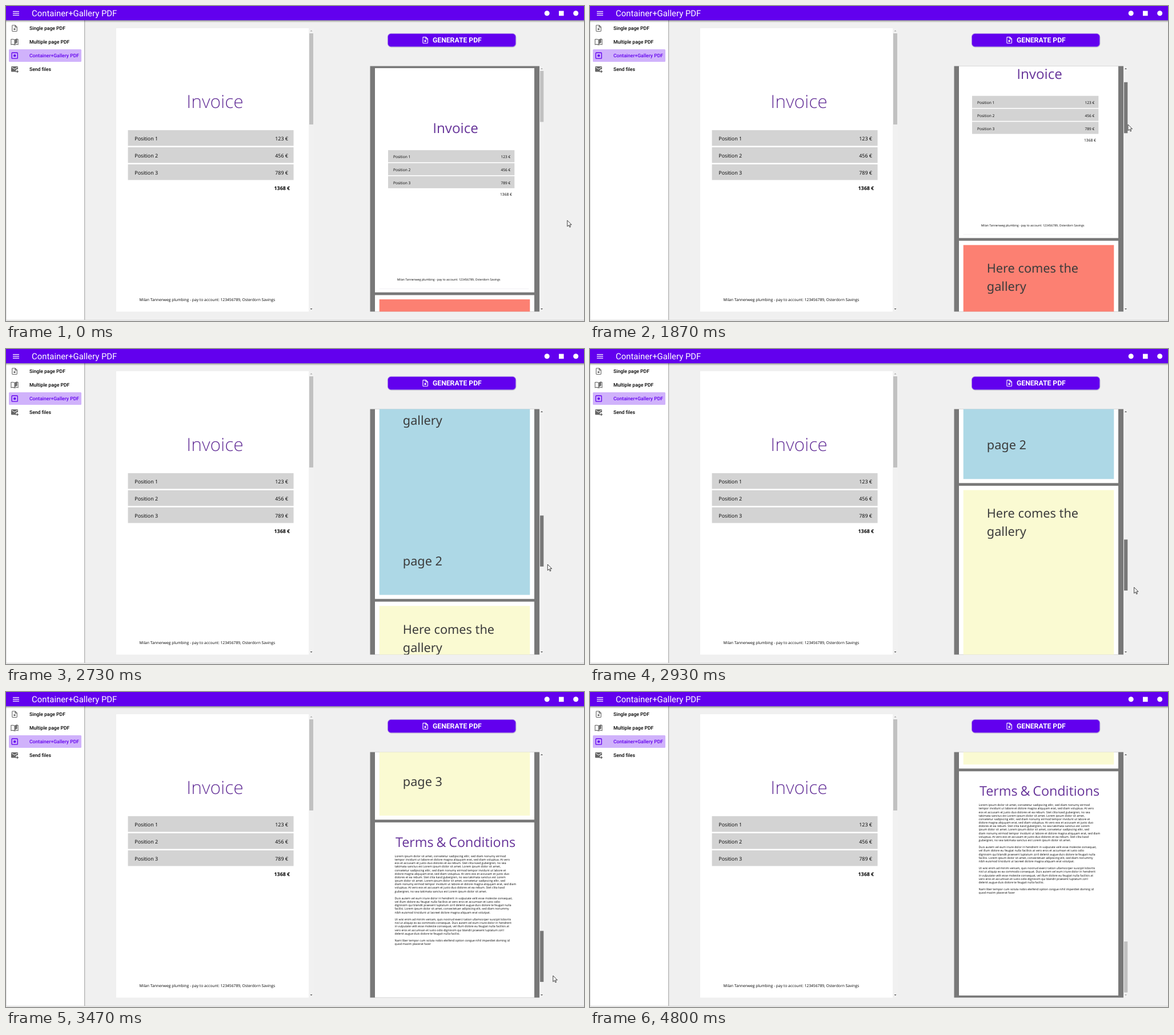
These frames come from a looping animation (1012x553 px, 5.27 s). An HTML page:

```html
<!DOCTYPE html>
<html lang="en">
<head>
<meta charset="utf-8">
<title>Container+Gallery PDF</title>
<style>
  html, body { margin: 0; width: 100%; height: 100%; overflow: hidden; background: #f0f0f0; }
  svg { display: block; }
  text { white-space: pre; text-rendering: geometricPrecision; }
  .rob { font-family: Roboto, sans-serif; }
  .open { font-family: "Open Sans", sans-serif; }
  .noto { font-family: "Noto Sans", sans-serif; }
</style>
</head>
<body>
<svg id="stage" width="1012" height="553" viewBox="0 0 1012 553"></svg>
<script>
const LOOP = 5270, TICK = 1000 / 15;
const PURPLE = '#6200ee', VIOLET = '#663399', GREY = '#787878';
const PITCH = 398.4, PAGE_H = 393.6, MAX_THUMB = 324, RATIO = 1563.5 / MAX_THUMB;

const rect = (x, y, w, h, fill, more = '') =>
  `<rect x="${x}" y="${y}" width="${w}" height="${h}" fill="${fill}" ${more}/>`;
const text = (x, y, size, cls, str, more = '') =>
  `<text x="${x}" y="${y}" font-size="${size}" class="${cls}" ${more}>${str}</text>`;
const end = 'text-anchor="end"', mid = 'text-anchor="middle"';
const arrow = (x, y, dir, fill, id = '') =>
  `<path ${id} d="M${x - 2} ${y + dir}h4l-2 ${-2 * dir}z" fill="${fill}"/>`;
const fileIcon = (x, y, color) =>
  `<g transform="translate(${x} ${y})"><path d="M1.2 .6h4.6l3.2 3.2v6.6q0 .9-.9.9h-6.9q-.7 0-.7-.9v-9q0-.8.7-.8zM5.6 .8v3.2h3.2"
    fill="none" stroke="${color}" stroke-width="1.1"/><circle cx="4.7" cy="7.4" r="1.7" fill="${color}"/></g>`;

const rows = [['Position 1', '123 €'], ['Position 2', '456 €'], ['Position 3', '789 €']];
const footer = 'Milan Tannenweg plumbing - pay to account: 123456789, Osterdorn Savings';

function header() {
  return rect(0, 25, 1012, 4, 'url(#shade)') + rect(0, 0, 1012, 25, PURPLE) +
    `<path d="M12 9.6h11M12 12.9h11M12 16.2h11" stroke="#fff" stroke-width="1.3"/>` +
    text(45, 17.8, 14.9, 'rob', 'Container+Gallery PDF', 'fill="#fff"') +
    `<circle cx="947.2" cy="12.8" r="4.5" fill="#fff"/>` +
    rect(968, 8.6, 8.6, 8.6, '#fff') +
    `<circle cx="997.7" cy="12.8" r="4.5" fill="#fff"/>`;
}

function sidebar() {
  const items = ['Single page PDF', 'Multiple page PDF', 'Container+Gallery PDF', 'Send files'];
  const labels = items.map((s, i) =>
    text(41, 42.1 + 24 * i, 8.6, 'rob', s, `font-weight="500" fill="${i === 2 ? PURPLE : '#000'}"`)).join('');
  const book = `<path d="M8.9 58.6q3-.9 6 .6v9q-3-1.3-6-.5zM15 59.2q2.700-1.400 6.100-.6v9.100q-3.100-.7-6.100.6"
      fill="none" stroke="#666" stroke-width="1.1"/><path d="M15.500 60l4-3.400v7.600l-4 3z" fill="#666"/>`;
  const box = `<rect x="10.100" y="82" width="10.200" height="10.200" rx="1" fill="none" stroke="${PURPLE}" stroke-width="1.300"/>
    <circle cx="15.200" cy="87.100" r="2.200" fill="${PURPLE}"/>`;
  const mail = `<path d="M10 106h10q1 0 1 1v4h-2.500l-2.500 4.500h-6q-1 0-1-1v-7.500q0-1 1-1z" fill="#666"/>
    <path d="M9.800 107.500l5.200 3.200 5.200-3.200" fill="none" stroke="#fff" stroke-width="1"/>
    <path d="M16 114.200h3.200v-2l3 2.800-3 2.800v-2h-3.200z" fill="#666"/>`;
  return rect(0, 25, 137, 526.5, '#fff') + rect(0, 25, 1, 527, '#dedede') +
    rect(137, 25, 1.2, 526.5, '#adadad') + rect(138.2, 25, 1, 526.5, '#dfdfdf') +
    rect(0, 551, 1012, 1, '#d2d2d2') + rect(0, 552, 1012, 1, '#f3f3f3') +
    rect(5, 76, 127, 22, '#d0b2fb', 'rx="1.5"') +
    fileIcon(10.3, 33.2, '#666') + book + box + mail + labels;
}

function form() {
  const list = rows.map(([a, b], i) => {
    const y = 218 + 30 * i;
    return rect(213.5, y, 290, 27.5, '#d3d3d3') +
      text(225.3, y + 17.9, 8.9, 'open', a) + text(494, y + 17.9, 8.9, 'open', b, end);
  }).join('');
  return rect(193, 39, 337, 497.5, '#fff') +
    text(366, 178.6, 31.7, 'open', 'Invoice', `${mid} font-weight="300" fill="${VIOLET}"`) + list +
    text(497, 323, 8.8, 'open', '1368 €', `${end} font-weight="700"`) +
    text(233.6, 518.4, 6.74, 'open', footer) +
    rect(530, 39, 9, 497.5, '#f1f1f1') + rect(531, 48, 7, 160, '#c1c1c1') +
    arrow(534.5, 43.6, 1, '#a3a3a3') + arrow(534.5, 532, -1, '#505050');
}

function button() {
  return rect(668.5, 49, 225, 24, '#000', 'rx="6.5" opacity=".12"') +
    rect(668.3, 48.3, 224.4, 23.4, PURPLE, 'rx="6" stroke="#b59be6" stroke-width="1"') +
    fileIcon(729.4, 54, '#fff') +
    text(747, 64.4, 12.2, 'rob', 'GENERATE PDF', 'font-weight="700" fill="#fff"');
}

const terms = `Lorem ipsum dolor sit amet, consetetur sadipscing elitr, sed diam nonumy eirmod
tempor invidunt ut labore et dolore magna aliquyam erat, sed diam voluptua. At vero
eos et accusam et justo duo dolores et ea rebum. Stet clita kasd gubergren, no sea
takimata sanctus est Lorem ipsum dolor sit amet. Lorem ipsum dolor sit amet,
consetetur sadipscing elitr, sed diam nonumy eirmod tempor invidunt ut labore et
dolore magna aliquyam erat, sed diam voluptua. At vero eos et accusam et justo duo
dolores et ea rebum. Stet clita kasd gubergren, no sea takimata sanctus est Lorem
ipsum dolor sit amet. Lorem ipsum dolor sit amet, consetetur sadipscing elitr, sed
diam nonumy eirmod tempor invidunt ut labore et dolore magna aliquyam erat, sed diam
voluptua. At vero eos et accusam et justo duo dolores et ea rebum. Stet clita kasd
gubergren, no sea takimata sanctus est Lorem ipsum dolor sit amet.

Duis autem vel eum iriure dolor in hendrerit in vulputate velit esse molestie consequat,
vel illum dolore eu feugiat nulla facilisis at vero eros et accumsan et iusto odio
dignissim qui blandit praesent luptatum zzril delenit augue duis dolore te feugait nulla
facilisi. Lorem ipsum dolor sit amet, consectetuer adipiscing elit, sed diam nonummy
nibh euismod tincidunt ut laoreet dolore magna aliquam erat volutpat.

Ut wisi enim ad minim veniam, quis nostrud exerci tation ullamcorper suscipit lobortis
nisl ut aliquip ex ea commodo consequat. Duis autem vel eum iriure dolor in hendrerit
in vulputate velit esse molestie consequat, vel illum dolore eu feugiat nulla facilisis at
vero eros et accumsan et iusto odio dignissim qui blandit praesent luptatum zzril
delenit augue duis dolore te feugait nulla facilisi.

Nam liber tempor cum soluta nobis eleifend option congue nihil imperdiet doming id
quod mazim placerat facer`;

// Page contents use y relative to the top of their page.
function invoicePage() {
  const list = rows.map(([a, b], i) => {
    const y = 144 + 22.8 * i;
    return rect(669, y, 221.3, 21.2, '#d3d3d3') +
      text(678, y + 14.3, 6.6, 'open', a) + text(883.3, y + 14.3, 6.5, 'open', b, end);
  }).join('');
  return text(787, 114, 24.2, 'open', 'Invoice', `${mid} fill="${VIOLET}"`) + list +
    text(886, 224, 6.7, 'open', '1368 €', end) +
    text(684.7, 373, 5.13, 'open', footer) + rect(653.5, 387, 262, .6, '#ebe8ec');
}

function galleryPage(n, color) {
  const line = (y, s) => text(694.8, y, 21.7, 'noto', s, 'fill="#3c3c3c"');
  return rect(653.7, 7.5, 263.6, 379, color) +
    line(56, 'Here comes the') + line(88, 'gallery') + line(334.5, 'page ' + n);
}

function termsPage() {
  return text(787, 43, 23.3, 'open', 'Terms &amp; Conditions', `${mid} word-spacing="-1.2" fill="${VIOLET}"`) +
    terms.split('\n').map((s, i) => text(680.6, 61 + 6.17 * i, 5.1, 'open', s)).join('');
}

function viewer() {
  const pages = [invoicePage(), galleryPage(1, '#fc8072'), galleryPage(2, '#add8e6'),
    galleryPage(3, '#fafad2'), termsPage()];
  const sheets = pages.map((p, i) => `<g transform="translate(0 ${109.1 + PITCH * i})">` +
    rect(646, 0, 279, PAGE_H, '#fff') + p + '</g>').join('');
  return rect(637.5, 105.5, 296.5, 431, GREY) +
    `<g clip-path="url(#view)"><g id="pages">${sheets}</g></g>` +
    rect(934, 105.5, 8, 431, '#f1f1f1') + rect(935, 114, 6.3, 89.5, '#c1c1c1', 'id="thumb"') +
    arrow(938, 110, 1, '#505050', 'id="up"') + arrow(938, 532, -1, '#505050', 'id="down"');
}

const stage = document.getElementById('stage');
stage.innerHTML = `<defs>
  <linearGradient id="shade" x2="0" y2="1"><stop stop-color="#000" stop-opacity=".38"/><stop offset="1" stop-color="#000" stop-opacity="0"/></linearGradient>
  <clipPath id="view"><rect x="637.5" y="105.5" width="296.5" height="431"/></clipPath></defs>` +
  rect(0, 0, 1012, 553, '#f0f0f0') + sidebar() + header() + form() + button() + viewer() +
  `<path id="cursor" d="M0 0V17L4 13.4 6.700 19.300 9.200 18.200 6.600 12.300H12Z" fill="#fff" stroke="#000" stroke-width="1.200"/>`;
const [pages, thumb, up, down, cursor] =
  ['pages', 'thumb', 'up', 'down', 'cursor'].map(id => document.getElementById(id));

// Monotone cubic through [time, value] keys, so rests stay still.
function track(keys) {
  const slope = i => (keys[i + 1][1] - keys[i][1]) / (keys[i + 1][0] - keys[i][0]);
  const tangent = i => {
    if (i === 0) return slope(0);
    if (i === keys.length - 1) return slope(i - 1);
    const a = slope(i - 1), b = slope(i);
    return a * b <= 0 ? 0 : 2 * a * b / (a + b);
  };
  return t => {
    const last = keys.length - 1;
    if (t <= keys[0][0]) return keys[0][1];
    if (t >= keys[last][0]) return keys[last][1];
    const i = keys.findIndex(k => k[0] > t) - 1;
    const [t0, a] = keys[i], [t1, b] = keys[i + 1];
    const d = t1 - t0, u = (t - t0) / d, v = 1 - u;
    return a * v * v * (1 + 2 * u) + b * u * u * (3 - 2 * u) +
      d * u * v * (v * tangent(i) - u * tangent(i + 1));
  };
}

const cursorX = track([[0, 982.8], [533, 920.5], [933, 940], [1200, 940], [1600, 942], [1867, 942],
  [2333, 946], [2733, 948.3], [3200, 957.8], [3867, 957.8], [4333, 405], [4733, 104]]);
const cursorY = track([[0, 376.4], [533, 174], [933, 188], [1200, 188], [1600, 187.5], [1667, 187.5],
  [1867, 208.2], [2333, 286.3], [2733, 378], [3200, 463.7], [3800, 530], [3867, 533.5], [4333, 549], [4733, 549]]);
const thumbY = track([[1667, 0], [1867, 19.8], [2333, 91.2], [2733, 178.3], [3200, 270.4], [3620, MAX_THUMB]]);

function draw(ms) {
  const t = Math.floor((ms + 5) / TICK) * TICK;
  const x = cursorX(t), y = cursorY(t), off = thumbY(t);
  const pressed = t > 1190 && t < 3900;
  const hover = x > 933.5 && x < 942 && y > 105 && y < 537;
  pages.setAttribute('transform', `translate(0 ${-off * RATIO})`);
  thumb.setAttribute('y', 114 + off);
  thumb.setAttribute('fill', pressed ? GREY : hover ? '#a8a8a8' : '#c1c1c1');
  up.setAttribute('fill', off > 0 ? '#505050' : '#a3a3a3');
  down.setAttribute('fill', off < MAX_THUMB ? '#505050' : '#a3a3a3');
  cursor.setAttribute('transform', `translate(${x} ${y}) scale(.62)`);
  cursor.setAttribute('visibility', t < 4790 ? 'visible' : 'hidden');
}

function loop() {
  draw(performance.now() % LOOP);
  requestAnimationFrame(loop);
}
loop();
</script>
</body>
</html>
```
